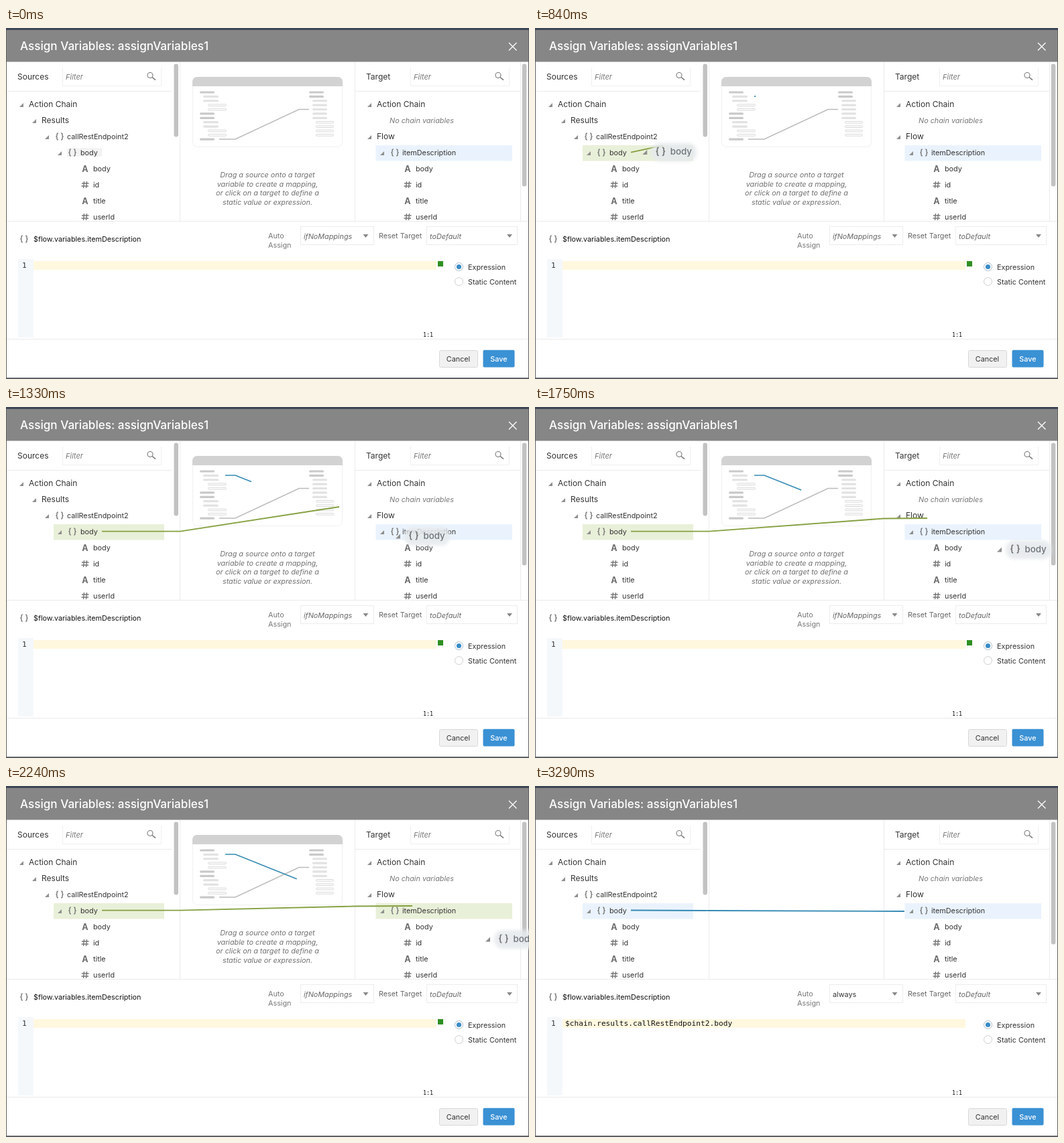
These frames come from a looping animation (780 px wide and 524 px high, 3.43 s). An HTML page:

```html
<!DOCTYPE html>
<html lang="en">
<head>
<meta charset="utf-8">
<title>Assign Variables</title>
<style>
  html, body { margin: 0; width: 100%; height: 100%; overflow: hidden; background: #fff; }
  svg { display: block; width: 780px; height: 524px; }
  text { font-family: Inter, "Liberation Sans", sans-serif; white-space: pre; }
  .mono { font-family: "DejaVu Sans Mono", monospace; }
</style>
</head>
<body>
<svg id="stage" viewBox="0 0 780 524" xmlns="http://www.w3.org/2000/svg"></svg>
<script>
const LOOP = 3430, STEP = 70;
const HOVER = 630, DRAG = 770, OVER = 2030, DROP = 2450;
const GREEN = '#85a040', BLUE = '#358ab4', PALE_GREEN = '#e9f0d9', PALE_BLUE = '#eaf3fd';

// Drawing helpers; text is placed by its vertical middle.
const rect = (x, y, w, h, fill, extra = '') =>
  `<rect x="${x}" y="${y}" width="${w}" height="${h}" fill="${fill}" ${extra}/>`;
const path = (d, stroke, width = 1, extra = '') =>
  `<path d="${d}" fill="none" stroke="${stroke}" stroke-width="${width}" ${extra}/>`;
const text = (s, x, y, size = 10.8, fill = '#333', extra = '') =>
  `<text x="${x}" y="${(y + size * 0.36).toFixed(2)}" font-size="${size}" fill="${fill}" ${extra}>${s}</text>`;
const group = (id, body, extra = '') => `<g id="${id}" ${extra}>${body}</g>`;
const italic = 'font-style="italic"';
const middle = 'text-anchor="middle"';

const arrow = (x, y, s = 6) =>
  `<path d="M${x + s / 2} ${y - s / 2}v${s}h${-s}z" fill="#8f8f8f"/>`;
const braces = (x, y, k = 1) => path(
  'M-2.2-5Q-4-5-4-3V-1.6Q-4 0-5.6 0Q-4 0-4 1.6V3Q-4 5-2.2 5' +
  'M2.2-5Q4-5 4-3V-1.6Q4 0 5.6 0Q4 0 4 1.6V3Q4 5 2.2 5',
  '#777', 1.4, `transform="translate(${x} ${y}) scale(${k})"`);
const caret = (x, y) => `<path d="M${x - 4} ${y - 2.5}h8l-4 5z" fill="#888"/>`;

function fields(x) {
  return [['A', 'body'], ['#', 'id'], ['A', 'title'], ['#', 'userId']].map(([icon, name], i) => {
    const y = 210 + 24 * i;
    const mark = icon === 'A'
      ? text('A', x, y, 12.5, '#6c6c6c', middle + ' font-weight="700"')
      : path(`M${x - 1.5} ${y - 5}l-1 10M${x + 2.5} ${y - 5}l-1 10M${x - 5} ${y - 2}h10.5M${x - 5.5} ${y + 2}h10.5`, '#777', 1.4);
    return mark + text(name, x + 12, y);
  }).join('');
}

function panelHead(x, title, filterX) {
  const right = filterX + 147;
  return text(title, x, 73, 12) +
    path(`M${filterX + .5} 59V86.5H${right + .5}V59`, '#f0f0f0') +
    text('Filter', filterX + 5, 73, 11, '#777', italic) +
    `<circle cx="${right - 16}" cy="70.5" r="4" fill="none" stroke="#777" stroke-width="1.1"/>` +
    path(`M${right - 13} 73.5l5 4.2`, '#777', 1.6);
}

function picture() {
  const tone = { d: '#c9c9c9', l: '#e2e2e2' };
  const bar = (kind, x, y, w) => kind === 'o'
    ? rect(x + .5, y - 1.2, w - 1, 2.6, '#fff', 'rx="1.3" stroke="#d4d4d4" stroke-width=".9"')
    : rect(x, y - 1.6, w, 3.2, tone[kind], 'rx="1.6"');
  const left = { d: [289, 22], l: [294, 23], o: [301, 28] };
  const rows = (kinds, cols) => [...kinds].map((k, i) =>
    bar(k, cols[k][0], 96 + 6.38 * i, cols[k][1])).join('');
  return rect(278.5, 73.5, 223, 104, '#fff', 'rx="7" stroke="#f0f0f0"') +
    '<path d="M278 87V80a7 7 0 0 1 7-7H495a7 7 0 0 1 7 7V87z" fill="#d2d2d2"/>' +
    rows('dlloodd' + 'lloo' + 'd', left) +
    rows('ddlllll' + 'oooo', { d: [452, 22], l: [457, 22], o: [462, 27] }) +
    path('M318 166H342L437 121.5H452', '#bcbcbc', 1.6) +
    ['Drag a source onto a target', 'variable to create a mapping,',
     'or click on a target to define a', 'static value or expression.']
      .map((s, i) => text(s, 390, 219 + 13.7 * i, 10.8, '#707070', italic + ' ' + middle)).join('');
}

const frame =
  rect(0, 0, 780, 524, '#5d6064') + rect(0, 0, 780, 3, '#3d4756') +
  rect(1, 3, 778, 48, '#868686') + rect(1, 50.5, 778, 471.5, '#fff') +
  text('Assign Variables: assignVariables1', 21, 27.3, 17.1, '#fff', 'font-weight="500"') +
  path('M750 22l11.5 11.5M761.5 22l-11.5 11.5', '#fff', 1.3) +
  path('M1 94.5H247M521 94.5H767M259.5 51V288M520.5 51V288M767.5 51V288M1 288.5H779M1 464.5H779', '#ebebeb') +
  rect(250.5, 53.5, 6.5, 109, '#c2c2c2', 'rx="3.2"') +
  rect(769.8, 53.5, 6.5, 183, '#c2c2c2', 'rx="3.2"') +
  panelHead(17, 'Sources', 84) + panelHead(537, 'Target', 603);

const trees =
  arrow(23, 115) + text('Action Chain', 34, 114, 12) +
  arrow(42, 139) + text('Results', 53, 138, 12) +
  arrow(61, 163) + braces(80, 162) + text('callRestEndpoint2', 91, 162) +
  arrow(80, 187) + braces(99, 186) + text('body', 111, 186) + fields(118) +
  arrow(542, 115) + text('Action Chain', 553, 114, 12) +
  text('No chain variables', 572, 138, 10.8, '#777', italic) +
  arrow(542, 163) + text('Flow', 553, 162, 12) +
  arrow(561, 187) + braces(580, 186) + text('itemDescription', 591, 186) + fields(599);

const bottom =
  braces(27, 315) + text('$flow.variables.itemDescription', 41, 315, 10.8, '#111') +
  text('Auto', 391, 310.5, 10.8, '#777') + text('Assign', 391, 324, 10.8, '#777') +
  rect(439.5, 296.5, 109, 27, '#fff', 'stroke="#ececec"') + caret(536.5, 310.5) +
  text('Reset Target', 556, 310.2, 10.8, '#666') +
  rect(627.5, 296.5, 135, 27, '#fff', 'stroke="#ececec"') + caret(751, 310.5) +
  text('toDefault', 632, 311, 10.8, '#666', italic) +
  rect(18, 345, 23, 117, '#f5f8fb') + rect(41, 348, 601, 13, '#fff8df') +
  text('1', 24, 354, 11.2, '#333', 'class="mono"') +
  text('1:1', 622, 458, 8.4, '#111', 'class="mono"') +
  '<circle cx="675.5" cy="356.5" r="6" fill="#fff" stroke="#a9bccb"/><circle cx="675.5" cy="356.5" r="3.6" fill="#3a8cc6"/>' +
  '<circle cx="675.5" cy="378.5" r="6" fill="#fff" stroke="#cfcfcf"/>' +
  text('Expression', 689, 357) + text('Static Content', 689, 379) +
  rect(646.5, 481.5, 57, 25, '#f1f1f1', 'rx="2" stroke="#d8d8d8"') +
  text('Cancel', 674.5, 494, 10.8, '#333', middle) +
  rect(711.5, 480.7, 47, 25.8, '#3a91d4', 'rx="2"') +
  text('Save', 735, 494, 10.8, '#fff', middle + ' font-weight="500"');

const stage = document.getElementById('stage');
stage.innerHTML =
  '<defs><filter id="soft" x="-30%" y="-50%" width="160%" height="200%"><feGaussianBlur stdDeviation="2.5"/></filter>' +
  '<clipPath id="pane"><path d="M0 51H780V288H0z"/></clipPath></defs>' +
  frame +
  group('help', picture() + path('', BLUE, 1.7, 'id="demo"')) +
  rect(71, 175, 165, 23.5, PALE_GREEN, 'id="from"') +
  rect(551.5, 175, 203.5, 23.5, PALE_BLUE, 'id="to"') +
  rect(91.5, 179.5, 51, 12, '#f3f3f3', 'id="label" rx="1"') +
  group('tree', trees, 'clip-path="url(#pane)"') +
  path('', GREEN, 1.8, 'id="wire" stroke-linejoin="round"') +
  bottom +
  group('before', text('ifNoMappings', 444, 311, 10.8, '#666', italic) + rect(644, 348, 8, 8, '#2f8f22')) +
  group('after', text('always', 444, 311, 10.8, '#333') +
    text('$chain.results.callRestEndpoint2.body', 45, 354, 11.2, '#111', 'class="mono"')) +
  group('card', rect(-14, -13, 68, 28, '#e6eaed', 'rx="13" filter="url(#soft)" opacity=".88"') +
    arrow(-23.5, 1, 7) + braces(0, 0, 1.2) + text('body', 14.5, .3, 13.3, '#6d7479', 'font-weight="500"'));

const el = Object.fromEntries([...stage.querySelectorAll('[id]')].map(n => [n.id, n]));
const show = (node, on) => node.setAttribute('visibility', on ? 'visible' : 'hidden');

// Smooth curve through [time, x, y] keys, at rest at both ends.
function along(keys, t) {
  const last = keys.length - 1;
  if (t <= keys[0][0]) return keys[0].slice(1);
  if (t >= keys[last][0]) return keys[last].slice(1);
  const i = keys.findIndex(k => k[0] > t) - 1;
  const a = keys[i], b = keys[i + 1], span = b[0] - a[0], u = (t - a[0]) / span;
  const slope = (j, c) => j === 0 || j === last ? 0
    : (keys[j + 1][c] - keys[j - 1][c]) / (keys[j + 1][0] - keys[j - 1][0]);
  return [1, 2].map(c =>
    a[c] * (1 + 2 * u) * (1 - u) ** 2 + b[c] * u * u * (3 - 2 * u) +
    span * (slope(i, c) * u * (1 - u) ** 2 - slope(i + 1, c) * u * u * (1 - u)));
}

const cardKeys = [[770, 99, 186], [910, 330, 183], [1050, 535, 188], [1330, 608, 192], [1750, 716, 212], [2240, 742, 228]];
const tipKeys = [[770, 144, 186], [910, 270, 160], [1050, 406, 147], [1330, 497, 149], [1750, 585, 166], [2240, 606, 179]];

function wirePath(t) {
  if (t >= DROP) return 'M143 185.5L260 186L551 187';
  const [x, y] = along(tipKeys, t);
  if (x <= 260) return `M143 185.6L${x} ${y}`;
  const knee = x > 520 ? `L520 ${y + .5}` : '';
  return `M143 185.6H260${knee}L${x} ${y}`;
}

function draw(t) {
  const dragging = t >= DRAG && t < DROP, done = t >= DROP;
  show(el.help, !done);
  show(el.before, !done);
  show(el.after, done);
  show(el.label, t < DRAG);
  show(el.from, t >= DRAG);
  show(el.wire, t >= DRAG);
  show(el.card, dragging);
  el.label.setAttribute('fill', t < HOVER ? '#f3f3f3' : '#f9f9f9');
  el.label.setAttribute('stroke', t < HOVER ? '#f3f3f3' : '#e3e3e3');
  el.from.setAttribute('fill', done ? PALE_BLUE : PALE_GREEN);
  el.to.setAttribute('fill', t >= OVER && !done ? PALE_GREEN : PALE_BLUE);
  el.wire.setAttribute('stroke', done ? BLUE : GREEN);
  el.wire.setAttribute('d', wirePath(t));
  el.card.setAttribute('transform', `translate(${along(cardKeys, t).join(' ')})`);

  const x = 327 + 0.0745 * (t - 808);
  const bend = x > 342 ? `H342L${x} ${102 + 0.4 * (x - 342)}` : `H${x}`;
  el.demo.setAttribute('d', x > 327 && !done ? 'M327 102' + bend : '');
}

const start = performance.now();
function tick() {
  const t = (performance.now() - start) % LOOP;
  draw(Math.floor(t / STEP) * STEP);
  requestAnimationFrame(tick);
}
tick();
</script>
</body>
</html>
```
